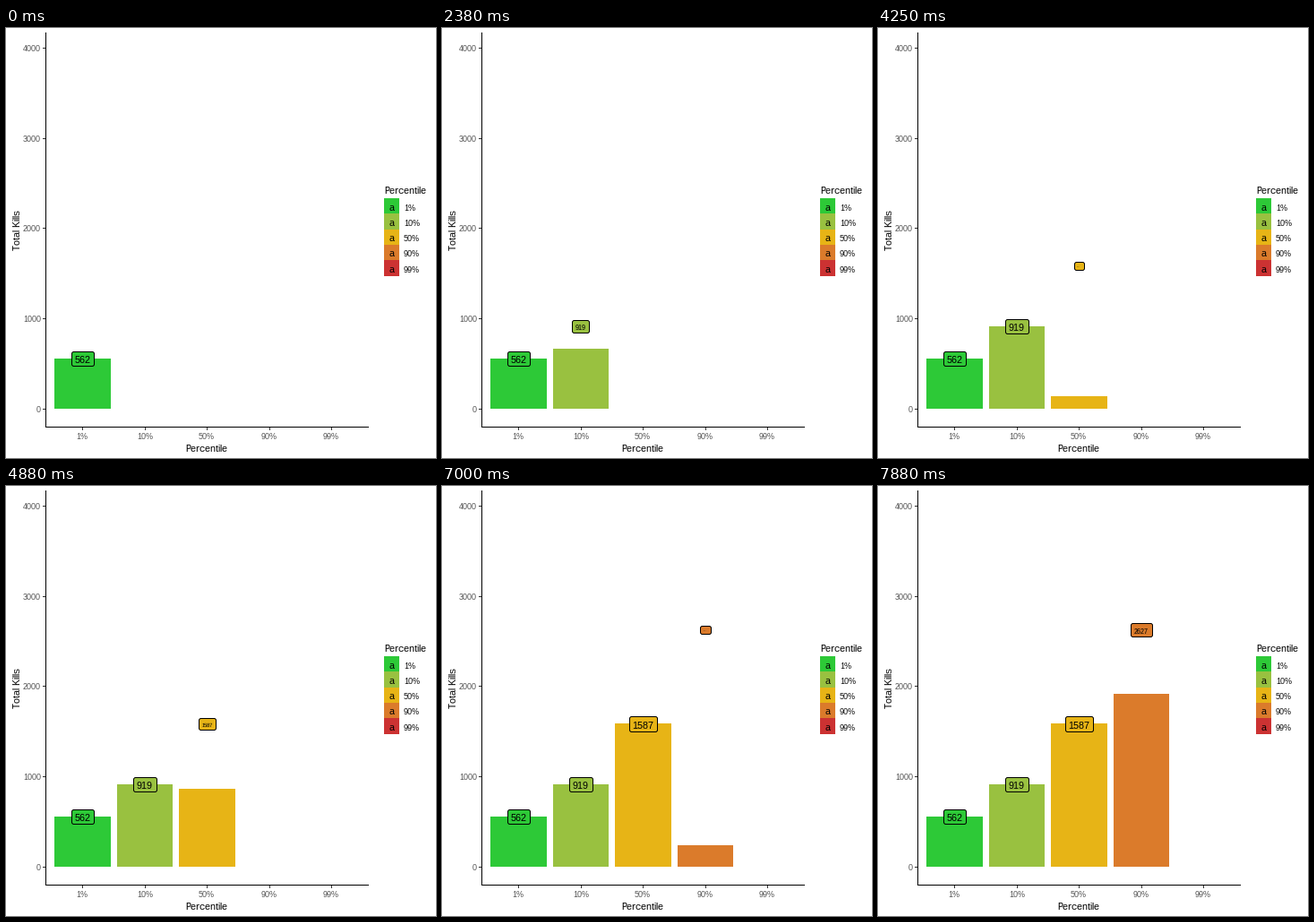
Animation of 480x480 px, one loop 8000 ms. Source, as a matplotlib script:

```python
import matplotlib.pyplot as plt
from matplotlib.animation import FuncAnimation
from matplotlib.patches import FancyBboxPatch, Rectangle

plt.rcParams.update({
    "font.family": "Liberation Sans",
    "text.hinting": "native",
    "text.hinting_factor": 1,
    "text.kerning_factor": 6,
})

SIZE, DPI = 480, 80
PX = 72 / DPI                      # points per pixel
FRAMES, INTERVAL = 64, 125
GROW, PERIOD, FIRST = 11, 22, 12   # frames per growth, between bars, first start

NAMES = ["1%", "10%", "50%", "90%", "99%"]
COLORS = ["#2dc937", "#99c140", "#e7b416", "#db7b2b", "#cc3232"]
VALUES = [562, 919, 1587, 2627]
BASE = 425

fig = plt.figure(figsize=(SIZE / DPI, SIZE / DPI), dpi=DPI, facecolor="white")
ax = fig.add_axes([0, 0, 1, 1])
ax.set_xlim(0, SIZE)
ax.set_ylim(SIZE, 0)
ax.axis("off")


def x_pos(i):
    return 85.4 + 69.5 * i


def y_pos(value):
    return 425.25 - 0.1009 * value


def rect(x0, y0, x1, y1, color):
    patch = Rectangle((x0, y0), x1 - x0, y1 - y0, fc=color, lw=0,
                      antialiased=False)
    return ax.add_patch(patch)


def text(x, y, s, size, color="black", ha="center", **kw):
    return ax.text(x, y, s, fontsize=size * PX, color=color, ha=ha,
                   va="baseline", **kw)


def draw_axes():
    rect(44, 5, 45, 446, "black")
    rect(44, 445, 405, 446, "black")
    for value in range(0, 4001, 1000):
        y = round(y_pos(value))
        rect(41, y, 44, y + 1, "#333333")
        text(39, y + 4, str(value), 9, "#4d4d4d", "right")
    for i, name in enumerate(NAMES):
        x = round(x_pos(i))
        rect(x, 446, x + 1, 449, "#333333")
        text(x, 459, name, 9, "#4d4d4d")
    text(223.5, 473, "Percentile", 11)
    text(16, 225.5, "Total Kills", 11, rotation=90, rotation_mode="anchor")


def draw_legend():
    text(422, 185, "Percentile", 11, ha="left")
    for i, (name, color) in enumerate(zip(NAMES, COLORS)):
        top = 190.2 + 17.28 * i
        rect(422, round(top), 439, round(top + 17.28), color)
        baseline = round(top + 13.4)
        text(430.5, baseline, "a", 11)
        text(444, baseline, name, 9, ha="left")


class Bar:
    """A bar that grows linearly while its value label scales up."""

    def __init__(self, i, value, color):
        self.start = FIRST + PERIOD * (i - 1)
        self.value = value
        self.x, self.y = x_pos(i), y_pos(value)
        left, right = round(self.x - 31.3), round(self.x + 31.3)
        self.bar = rect(left, BASE, right, BASE, color)
        self.box = FancyBboxPatch((0, 0), 1, 1, fc=color, ec="black", lw=PX,
                                  boxstyle="round,pad=0,rounding_size=2.2",
                                  zorder=3)
        ax.add_patch(self.box)
        self.label = text(self.x - 0.2, 0, str(value), 11, zorder=4)

    def update(self, frame):
        step = min(max(frame - self.start + 1, 0), GROW)
        for part in (self.bar, self.box, self.label):
            part.set_visible(step > 0)
        if step == 0:
            return
        top = round(y_pos(self.value * step / GROW))
        self.bar.set_y(top)
        self.bar.set_height(BASE - top)

        # The label's font size in pixels equals the step.
        half_w = (round(0.556 * step) * len(str(self.value)) + 7.2) / 2
        half_h = (round(0.72 * step) + 7.2) / 2
        x0, x1 = round(self.x - half_w), round(self.x + half_w)
        y0 = round(self.y - half_h - 0.2)
        y1 = round(self.y + half_h + 1)
        self.box.set_bounds(x0 + 0.5, y0 + 0.5, x1 - x0, y1 - y0)
        self.label.set_fontsize(step * PX)
        self.label.set_y(round(self.y + 0.36 * step + 1.7))


draw_axes()
draw_legend()
bars = [Bar(i, v, c) for i, (v, c) in enumerate(zip(VALUES, COLORS))]


def update(frame):
    for bar in bars:
        bar.update(frame)
    return []


def init():
    return update(0)


anim = FuncAnimation(fig, update, frames=FRAMES, init_func=init,
                     interval=INTERVAL, repeat=True, repeat_delay=0)
plt.show()
```
